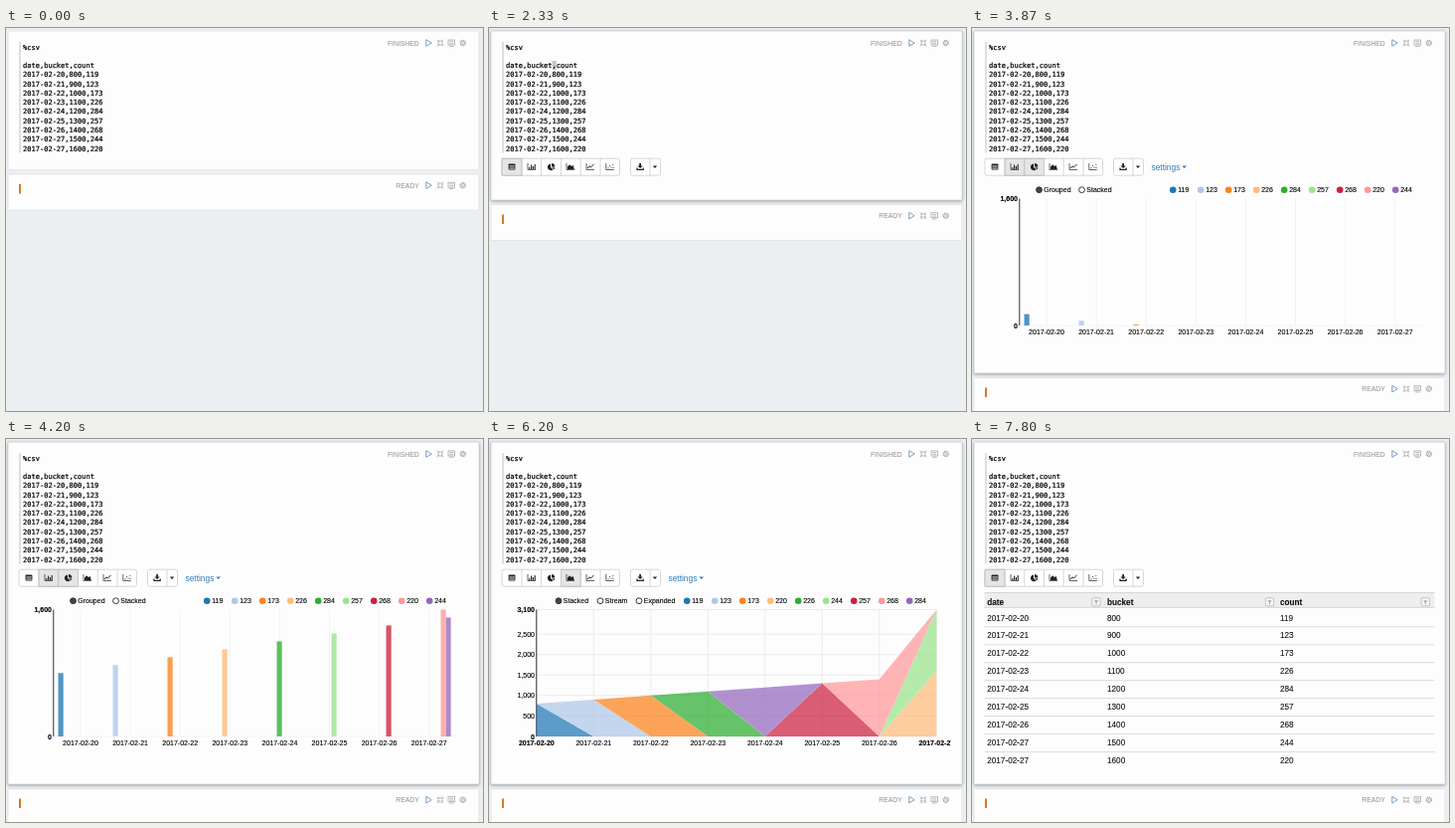
Recreate the animation shown at these times as an HTML page. Size 480 by 385 pixels, loop 8 s.

```html
<!DOCTYPE html>
<html lang="en">
<head>
<meta charset="utf-8">
<title>Notebook charts</title>
<style>
html, body { margin: 0; width: 100%; height: 100%; overflow: hidden; background: #ebeff1; }
svg { display: block; width: 480px; height: 385px; font-family: "Liberation Sans", Arial, sans-serif; }
.panel { fill: #fefdfe; stroke: #dfe2e4; stroke-width: .8; }
.panel.focus { stroke: #cfd3d6; filter: drop-shadow(0 1px 1.6px rgba(40, 50, 60, .42)); }
.code { font: 7.04px "DejaVu Sans Mono", monospace; stroke: #000; stroke-width: .22; }
.status { font-size: 6.8px; fill: #8f8f8f; text-anchor: end; }
.cell { font-size: 8.2px; fill: #111; stroke: #111; stroke-width: .1; }
.chart { font-size: 7px; }
.chart text { stroke: #000; stroke-width: .12; }
.end { text-anchor: end; }
.mid { text-anchor: middle; }
.bold { font-weight: bold; }
</style>
</head>
<body>
<svg id="stage" viewBox="0 0 480 385"></svg>
<script>
const LOOP = 8000;
const RUN = 2330, TABLE = 2470, BARS = 3800, AREA = 5600, BACK = 7600;
const TOP = 171.5, BASE = 299, PLOT = BASE - TOP;

const days = [20, 21, 22, 23, 24, 25, 26, 27, 27].map(d => '2017-02-' + d);
const counts = [119, 123, 173, 226, 284, 257, 268, 244, 220];
const rows = days.map((day, i) => [day, 800 + 100 * i, counts[i]]);
const dates = days.slice(0, 8);
const barKeys = [119, 123, 173, 226, 284, 257, 268, 220, 244];
const areaKeys = [...counts].sort((a, b) => a - b);
const colors = ['#1f77b4', '#aec7e8', '#fb8219', '#ffbb78', '#2cae30', '#98e58a', '#cc2040', '#ff9898', '#9467bd'];

const text = (x, y, s, cls = '', more = '') => `<text x="${x}" y="${y}" class="${cls}" ${more}>${s}</text>`;
const rect = (x, y, w, h, fill, more = '') => `<rect x="${x}" y="${y}" width="${w}" height="${h}" fill="${fill}" ${more}/>`;
const path = (d, fill, stroke = 'none', width = 1) => `<path d="${d}" fill="${fill}" stroke="${stroke}" stroke-width="${width}"/>`;
const line = (d, stroke, width = 1) => path(d, 'none', stroke, width);
const dot = (x, y, r, fill, more = '') => `<circle cx="${x}" cy="${y}" r="${r}" fill="${fill}" ${more}/>`;
const group = (id, body, more = '') => `<g id="${id}" ${more}>${body}</g>`;

// Status word and the four control icons, centred on y
function controls(label, y) {
  const gray = '#aaa';
  let s = text(415.7, y + 2.5, label, 'status');
  s += line(`M422.8 ${y - 3.3}L428.2 ${y}L422.8 ${y + 3.3}Z`, '#6c93b8', .9);
  for (const [a, b] of [[-1, -1], [1, -1], [-1, 1], [1, 1]]) {
    const px = 437 + a, py = y + b;
    s += line(`M${px + 2.3 * a} ${py + 2.3 * b}L${px} ${py}M${px + 2 * a} ${py}H${px}V${py + 2 * b}`, gray, .8);
  }
  s += rect(445, y - 3, 6.6, 5, 'none', `stroke="${gray}" stroke-width=".8"`);
  s += line(`M446.3 ${y - 1.4}h4M446.3 ${y + .4}h4M446 ${y + 3.3}h4.6`, gray, .8);
  s += dot(459.7, y, 2.7, 'none', `stroke="${gray}" stroke-width="1.2" stroke-dasharray="1.4 .7"`);
  return s + dot(459.7, y, 1.9, 'none', `stroke="${gray}" stroke-width=".7"`) + dot(459.7, y, .7, gray);
}

function editor() {
  const lines = ['%csv', '', 'date,bucket,count', ...rows.map(r => r.join())];
  return rect(13, 14, 2, 111.5, '#dcdee0') +
    rect(63.6, 33, 4.2, 9.2, '#c3c5c8', 'id="caret"') +
    lines.map((s, i) => text(17, 21.5 + 9.28 * i, s, 'code')).join('');
}

const edges = [13, 33, 52.7, 72.5, 92.2, 112, 131.5];

function toolbar() {
  const ink = '#222', rim = 'rx="2" stroke="#ccc" stroke-width=".8"';
  const axes = x => line(`M${x - 4} 136V142.5H${x + 4}`, ink, .7);
  let s = rect(13, 131.2, 118.5, 17, '#fff', rim) + rect(142.5, 131.2, 30, 17, '#fff', rim);
  for (let i = 0; i < 6; i++) s += rect(edges[i], 131.2, edges[i + 1] - edges[i], 17, '#e4e5e6', `id="btn${i}" stroke="#b4b6b8" stroke-width=".8"`);
  s += line(edges.slice(1, 6).map(x => `M${x} 131.2v17`).join('') + 'M162 131.2v17', '#ccc', .8);
  s += rect(19.6, 136.6, 6.8, 5.8, ink, 'rx=".6"');
  s += line('M20.2 138.5h5.8M20.2 140h5.8M20.2 141.4h5.8M22 138v4M24.1 138v4', '#ddd', .5);
  s += axes(43) + line('M40.8 142v-2M42.6 142v-4.5M44.4 142v-3M46.2 142v-5', ink, 1.1);
  s += path('M62 140V136.4A3.4 3.4 0 1 0 64.6 142.3Z', ink) + path('M63 139.4V136A3.4 3.4 0 0 1 66.3 139.4Z', ink) + path('M63.4 140.2h2.9a3.3 3.3 0 0 1 -1 2Z', ink);
  s += axes(82) + path('M79 142V139.5L81 137.2L83.2 139L84.6 137.8L85.8 142Z', ink);
  s += axes(102) + line('M99 141L101 138.8L102.4 140L105.6 136.8', ink, 1);
  s += axes(121.8);
  for (const [x, y] of [[120, 140.7], [121.5, 138.2], [123, 140], [124.8, 137.2], [125, 140.5]]) s += dot(x, y, .55, ink);
  s += path('M151.2 136h1.8v2.4h1.8L152.1 141L149.4 138.4h1.8Z', ink) + line('M149 140.6v1.7h6.2v-1.7', ink, 1.2);
  return s + path('M164.8 138.6h4.4L167 141Z', ink);
}

function table(xs, boxes, first) {
  const head = first - 10.2;
  let s = rect(12.5, 154.5, 453, head - 154.5, '#eeeeef') + line(`M12.5 154.5h453M12.5 ${head}h453`, '#d2d3d5', .9);
  ['date', 'bucket', 'count'].forEach((name, i) => {
    const b = boxes[i];
    s += text(xs[i], 167.2, name, 'cell bold');
    s += rect(b - 4.2, 159.8, 8.4, 8, '#f6f6f7', 'rx="1" stroke="#b5b6b8" stroke-width=".8"');
    s += path(`M${b - 2.2} 162.2h4.4L${b + .5} 164.6v1.6h-1v-1.6Z`, '#aaa');
  });
  rows.forEach((row, i) => {
    const y = first + 17.97 * i;
    row.forEach((v, c) => s += text(xs[c], y + 2.9, v, 'cell'));
    if (i < 8) s += line(`M12.5 ${y + 9.2}h453`, '#d6d7d9', .9);
  });
  return s;
}

function legend(modes, keys, x0) {
  return modes.map(([x, name], i) =>
    dot(x, 162.7, 2.9, i ? '#fff' : '#444', 'stroke="#333" stroke-width="1"') + text(x + 4.8, 165.2, name)).join('') +
    keys.map((k, i) => dot(x0 + 28 * i, 162.7, 3.3, colors[i]) + text(x0 + 5 + 28 * i, 165.2, k)).join('');
}

const axisLine = line(`M47.8 ${TOP}V${BASE}`, '#333', 1);

function barChart() {
  const tick = i => 75 + 50.1 * i;
  return legend([[67.5, 'Grouped'], [110.5, 'Stacked']], barKeys, 202.2) +
    line(dates.map((_, i) => `M${tick(i)} ${TOP}V${BASE}`).join('') + `M47.8 ${BASE}H453`, '#efeff1', .8) + axisLine +
    text(46, 174, '1,600', 'end bold') + text(46, 301.5, '0', 'end bold') +
    dates.map((d, i) => text(tick(i), 308, d, 'mid')).join('') + group('bars', '', 'opacity=".77"');
}

const areaX = i => 47.8 + 57.5 * i;
const areaY = v => BASE - v * PLOT / 3100;

function areaChart() {
  const ticks = [0, 500, 1000, 1500, 2000, 2500, 3100];
  return legend([[70, 'Stacked'], [112, 'Stream'], [151, 'Expanded']], areaKeys, 199.2) +
    line(ticks.map(v => `M47.8 ${areaY(v)}H450.3`).join('') + dates.map((_, i) => `M${areaX(i)} ${TOP}V${BASE}`).join(''), '#e6e7e9', .8) +
    axisLine + group('areas', '', 'opacity=".72"') +
    ticks.map(v => text(46, areaY(v) + 2.5, v.toLocaleString('en-US'), v % 3100 ? 'end' : 'end bold')).join('') +
    `<g clip-path="url(#plotClip)">${dates.map((d, i) => text(areaX(i), 308, d, i % 7 ? 'mid' : 'mid bold')).join('')}</g>`;
}

// Each series stacked on the ones before it, day by day
const floor = dates.map(() => 0);
const stack = areaKeys.map(key => dates.map((d, i) => {
  const row = rows.find(r => r[0] === d && r[2] === key);
  const low = floor[i], size = row ? row[1] : 0;
  floor[i] += size;
  return [low, size];
}));

document.getElementById('stage').innerHTML =
  `<clipPath id="tableClip">${rect(0, 150, 480, 178.5, '#000')}</clipPath><clipPath id="plotClip">${rect(0, 150, 465, 170, '#000')}</clipPath>` +
  group('second', rect(2, 4.5, 474, 36, '', 'rx="1" class="panel"') + rect(13, 14.5, 2, 9.5, '#d07c2c') + controls('READY', 15.7)) +
  rect(2, 3, 474, 139.5, '', 'rx="1" class="panel" id="first"') +
  editor() + controls('FINISHED', 15) +
  group('tools', toolbar()) +
  group('settings', text(180.5, 142.6, 'settings', '', 'font-size="8.4" fill="#337ab7"') + path('M211.4 138.6h4.6L213.7 141Z', '#337ab7')) +
  group('wide', table([15, 184, 333], [173.7, 322.5, 456.3], 182.2), 'clip-path="url(#tableClip)"') +
  group('grip', path('M462 329.2V333.8H457.4Z', '#555')) +
  group('narrow', table([15.2, 136, 310], [125, 299.5, 456.3], 179.6)) +
  group('barChart', barChart(), 'class="chart"') +
  group('areaChart', areaChart(), 'class="chart"');

const el = id => document.getElementById(id);
const show = (id, on) => el(id).style.display = on ? '' : 'none';
const ease = k => {
  k = Math.min(1, Math.max(0, k));
  return k < .5 ? 4 * k ** 3 : 1 - (2 - 2 * k) ** 3 / 2;
};

function drawBars(t) {
  el('bars').innerHTML = rows.map(([day, value, key]) => {
    const i = dates.indexOf(day), j = barKeys.indexOf(key);
    const h = value / 1600 * PLOT * ease((t - 20 * i) / 200);
    return rect(52.5 + 50.05 * i + 4.95 * j, BASE - h, 5.2, h, colors[j]);
  }).join('');
}

function drawAreas(t) {
  const k = ease(t / 300);
  el('areas').innerHTML = stack.map((s, j) => {
    const top = s.map(([low, size], i) => areaX(i) + ' ' + areaY(low + size * k));
    const bottom = s.map(([low], i) => areaX(i) + ' ' + areaY(low)).reverse();
    return path('M' + top.concat(bottom).join('L') + 'Z', colors[j]);
  }).join('');
}

function draw(t) {
  const within = (a, b) => t >= a && t < b;
  const bottom = t < RUN ? 142.5 : t < TABLE ? 173 : t < BARS ? 350 : 347;
  const charts = within(BARS, BACK);
  el('first').setAttribute('height', bottom - 3);
  el('first').classList.toggle('focus', t >= 530);
  el('second').setAttribute('transform', `translate(0 ${bottom})`);
  show('caret', within(530, 930) || within(1330, 1930) || within(RUN, 3470));
  show('tools', t >= RUN);
  show('settings', charts);
  show('wide', within(TABLE, BARS));
  show('grip', within(TABLE, 3070));
  show('narrow', t >= BACK);
  show('barChart', within(BARS, AREA));
  show('areaChart', within(AREA, BACK));
  // Pressed button plus the one under the pointer
  show('btn0', t < BARS || t >= 7000);
  show('btn1', within(3070, AREA));
  show('btn2', within(BARS, 5400));
  show('btn3', within(5400, BACK));
  show('btn4', false);
  show('btn5', false);
  if (within(BARS, AREA)) drawBars(t - BARS);
  if (within(AREA, BACK)) drawAreas(t - AREA);
}

function tick() {
  draw(performance.now() % LOOP);
  requestAnimationFrame(tick);
}
tick();
</script>
</body>
</html>
```
